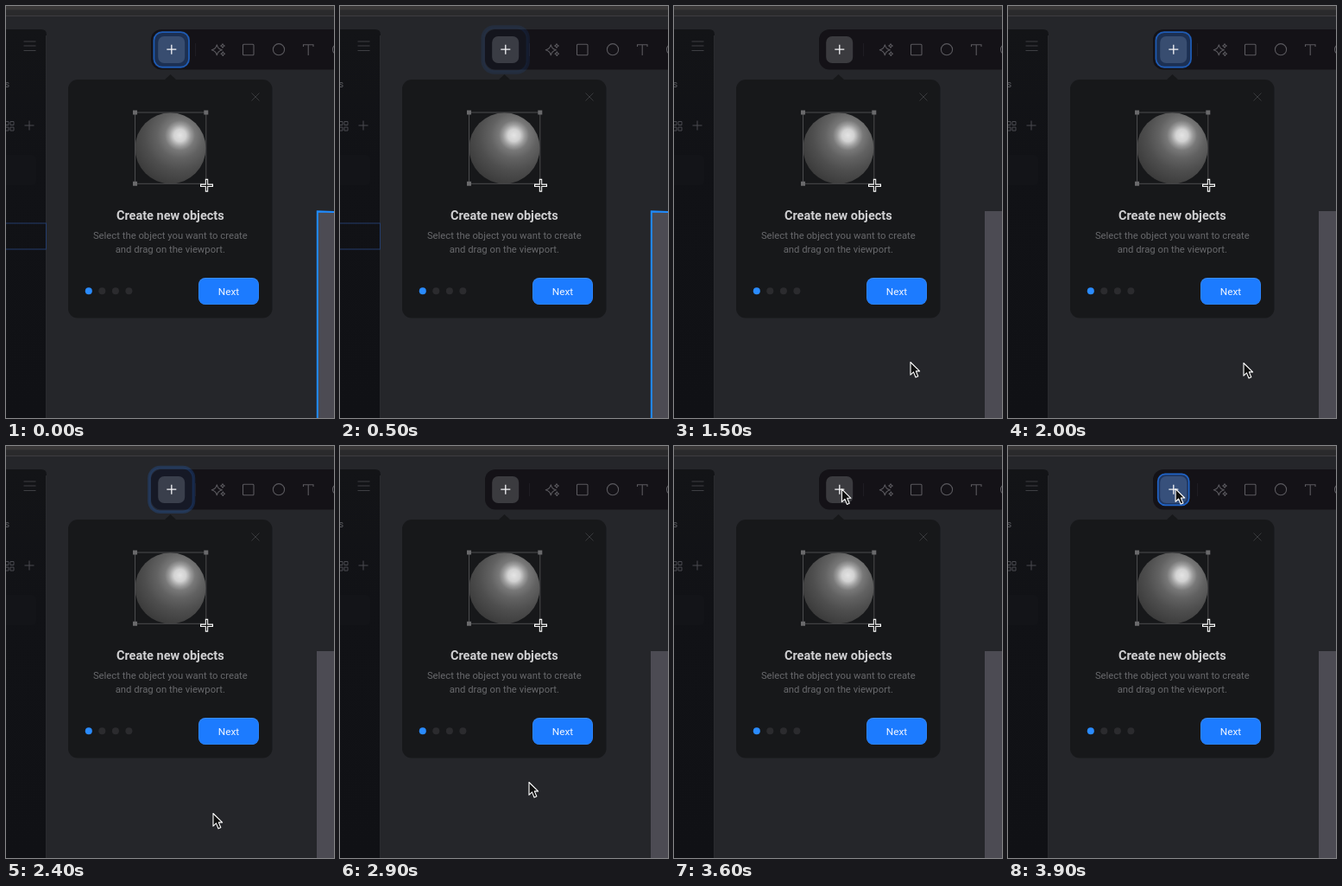
An HTML page that plays this animation: 380x476 px, repeating every 4000 ms.

```html
<!DOCTYPE html>
<html lang="en">
<head>
<meta charset="utf-8">
<title>Create new objects</title>
<style>
  html, body { margin: 0; width: 100%; height: 100%; overflow: hidden; background: #25262a; }
  svg { display: block; width: 380px; height: 476px; }
  text { font-family: Roboto, "Liberation Sans", sans-serif; }
  .icon { fill: none; stroke: #5b5a5f; stroke-width: 1.1; }
  .side { fill: none; stroke: #4a4b50; stroke-width: 1; }
</style>
</head>
<body>
<svg viewBox="0 0 380 476" xmlns="http://www.w3.org/2000/svg">
  <defs>
    <radialGradient id="ball" gradientUnits="userSpaceOnUse" cx="201.5" cy="149.5" r="70">
      <stop offset="0" stop-color="#e4e4e4"/>
      <stop offset=".1" stop-color="#d2d2d2"/>
      <stop offset=".18" stop-color="#9c9c9c"/>
      <stop offset=".25" stop-color="#787878"/>
      <stop offset=".38" stop-color="#626262"/>
      <stop offset=".58" stop-color="#4e4e4e"/>
      <stop offset=".8" stop-color="#3e3e3e"/>
      <stop offset="1" stop-color="#2e2e2e"/>
    </radialGradient>
    <linearGradient id="panel" x1="0" y1="0" x2="0" y2="1">
      <stop offset="0" stop-color="#131417"/>
      <stop offset=".35" stop-color="#111216"/>
      <stop offset="1" stop-color="#101115"/>
    </linearGradient>
  </defs>

  <!-- window -->
  <rect width="380" height="476" fill="#25262a"/>
  <rect width="380" height="11" fill="#2a2a2c"/>
  <rect width="380" height="4.5" fill="#393738"/>
  <rect y="11" width="380" height="1" fill="#3d3d40"/>

  <!-- side panel -->
  <path d="M0 27H41Q47 27 47 33V476H0Z" fill="url(#panel)"/>
  <path d="M46.5 34V476" stroke="#2a2b2f"/>
  <path class="side" d="M20.5 41H34.5M20.5 46H34.5M20.5 51.5H34.5" style="stroke:#3e3f43"/>
  <text x="-1.5" y="94" font-size="11" fill="#5c5d61">s</text>
  <path class="side" d="M-1 133.5H3V137.5H-1ZM5 133.5H9V137.5H5ZM-1 140H3V144H-1ZM5 140H9V144H5Z"/>
  <path class="side" d="M21.5 138H32.5M27 132.5V143.5"/>
  <rect x="-6" y="172" width="41" height="35" rx="5" fill="#131418"/>
  <rect id="row" x="-5" y="251" width="51.5" height="30" fill="none" stroke="#243d6c"/>

  <!-- object in the viewport -->
  <rect x="360" y="237" width="30" height="250" fill="#4c4b53"/>
  <path id="edge" d="M360.8 480V237.4L384 238.2" fill="none" stroke="#1f8cff" stroke-width="2"/>

  <!-- toolbar -->
  <rect x="168" y="27" width="230" height="46.5" rx="12" fill="#141217"/>
  <path d="M219.5 43V58" stroke="#1e1c22"/>
  <rect x="176.2" y="35" width="31" height="31" rx="7" fill="#3b3b3f"/>
  <rect id="ring" fill="#3078e8" stroke="#2270e0"/>
  <path d="M186.3 50.2H197.3M191.8 44.7V55.7" stroke="#f4f4f6" stroke-width="1.3"/>
  <g class="icon">
    <path id="stars" stroke-linejoin="round"/>
    <rect x="274.5" y="44.2" width="12.5" height="12.5" rx="1"/>
    <circle cx="316" cy="50.2" r="6.6"/>
    <path d="M344.5 47V44.8H356V47M350.2 44.8V57"/>
    <circle cx="384.5" cy="50.2" r="6"/>
  </g>

  <!-- tip card -->
  <path d="M183 86L190.5 79L198 86Z" fill="#17181a"/>
  <rect x="72" y="85" width="236.5" height="275.5" rx="11" fill="#17181a"/>
  <path d="M284.5 100.5L293.5 109.5M293.5 100.5L284.5 109.5" stroke="#38393c"/>
  <circle cx="190.5" cy="164.3" r="41" fill="url(#ball)"/>
  <rect x="149.5" y="123" width="82.3" height="82.3" fill="none" stroke="#4c4c4e"/>
  <path d="M147 120.5H152V125.5H147ZM229.3 120.5H234.3V125.5H229.3ZM147 202.8H152V207.8H147Z" fill="#6a6a6c"/>
  <path d="M225 207.3H240M232.5 199.8V214.8" stroke="#fff" stroke-width="3.4"/>
  <path d="M226.2 207.3H238.8M232.5 201V213.6" stroke="#161616" stroke-width="1.3"/>
  <g text-anchor="middle">
    <text x="190.3" y="246.8" font-size="14.5" font-weight="700" fill="#d0d0d2">Create new objects</text>
    <g font-size="11.3" fill="#68696c">
      <text x="190.3" y="269.2">Select the object you want to create</text>
      <text x="190.3" y="284.5">and drag on the viewport.</text>
    </g>
    <rect x="223" y="314" width="70" height="31" rx="8" fill="#3a8eff"/>
    <rect x="223.5" y="314.9" width="69" height="29.7" rx="7.5" fill="#1c7bff"/>
    <text x="258" y="333.5" font-size="11.8" fill="#eef4ff">Next</text>
  </g>
  <g fill="#2b2b2e">
    <circle cx="95.8" cy="329.2" r="4" fill="#2a8bff"/>
    <circle cx="111.3" cy="329.2" r="4"/>
    <circle cx="126.9" cy="329.2" r="4"/>
    <circle cx="142.4" cy="329.2" r="4"/>
  </g>

  <path id="arrow" d="M0 .5V15.2L3.5 11.9L6 18L8.8 16.8L6.3 10.9H10.6Z" fill="#101010" stroke="#fff" stroke-width="1.1" stroke-linejoin="round"/>
</svg>
<script>
  const LOOP = 4000, STEP = 100;
  const el = id => document.getElementById(id);
  const ring = el("ring"), arrow = el("arrow"), row = el("row"), edge = el("edge");

  // pointer path: time, x, y
  const path = [
    [600, 302, 418], [800, 292, 415], [1200, 277, 411.5], [1500, 274, 411],
    [2000, 273, 412], [2200, 260, 420], [2400, 240, 424], [2700, 230, 416],
    [2900, 219, 388], [3000, 214, 352], [3100, 209, 190], [3200, 205, 69],
    [3300, 199, 56], [3500, 194.5, 49.5], [4000, 194, 49]
  ];

  // four-pointed star with softly curved sides
  function star(x, y, r) {
    const c = r * 0.2;
    return `M${x} ${y - r}Q${x + c} ${y - c} ${x + r} ${y}Q${x + c} ${y + c} ${x} ${y + r}` +
      `Q${x - c} ${y + c} ${x - r} ${y}Q${x - c} ${y - c} ${x} ${y - r}Z`;
  }
  el("stars").setAttribute("d", star(244.3, 50.8, 6) + star(251, 46, 2.3) + star(251.3, 55.2, 2.3));

  const set = (node, attrs) => {
    for (const k in attrs) node.setAttribute(k, attrs[k]);
  };
  const show = (node, on) => set(node, { visibility: on ? "visible" : "hidden" });

  function pointAt(t) {
    const i = Math.max(1, path.findIndex(p => p[0] >= t));
    const [t0, x0, y0] = path[i - 1], [t1, x1, y1] = path[i];
    const k = (t - t0) / (t1 - t0);
    return [x0 + (x1 - x0) * k, y0 + (y1 - y0) * k];
  }

  function drawRing(t) {
    const u = ((t + 200) % 2000) / 800;
    show(ring, u < 1);
    if (u >= 1) return;
    const half = 16 + 12.5 * (1 - Math.pow(1 - u, 1.9));
    const width = 1.6 + 3.6 * u * u;
    const r = half - width / 2;
    set(ring, {
      x: 191.7 - r, y: 50.4 - r, width: 2 * r, height: 2 * r,
      rx: 7 + (half - 16) * 0.5,
      "stroke-width": width,
      "stroke-opacity": Math.pow(1 - u, 1.1),
      "fill-opacity": 0.42 * Math.pow(1 - u, 1.3)
    });
  }

  function draw(t) {
    show(edge, t < 600);
    show(row, t < 700);
    show(arrow, t >= 600);
    if (t >= 600) set(arrow, { transform: `translate(${pointAt(t)})` });
    drawRing(t);
  }

  const start = performance.now();
  function tick() {
    const t = (performance.now() - start) % LOOP;
    draw(Math.floor(t / STEP) * STEP);
    requestAnimationFrame(tick);
  }
  tick();
</script>
</body>
</html>
```
